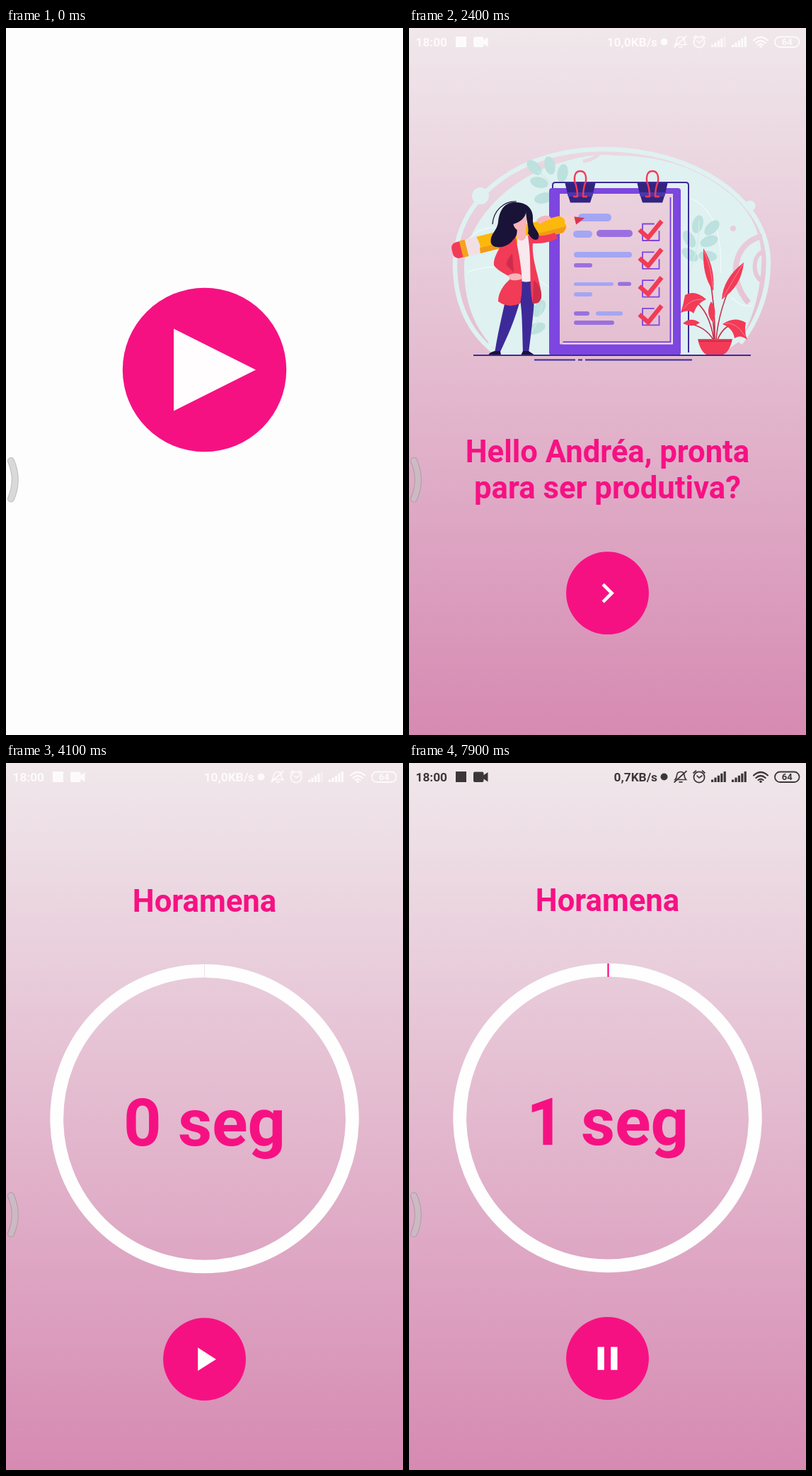
An HTML page that plays this animation: 561x998 px, repeating every 8000 ms.

```html
<!DOCTYPE html>
<html lang="pt">
<head>
<meta charset="utf-8">
<title>Timer</title>
<style>
html, body { margin: 0; width: 100%; height: 100%; overflow: hidden; background: #fefdfe; }
svg { display: block; width: 100vw; height: 100vh; }
text { font-family: Roboto, sans-serif; font-weight: 700; }
.title { font-size: 43.64px; text-anchor: middle; fill: #f61183; }
.count { font-size: 93.5px; text-anchor: middle; fill: #f61183; }
.small { font-size: 17.3px; fill: currentColor; font-weight: 600; }
</style>
</head>
<body>
<svg id="stage" viewBox="0 0 561 998" xmlns="http://www.w3.org/2000/svg"></svg>
<script>
const PINK = '#f61183', MINT = '#dff1f1', LEAF = '#bce1de', RED = '#f23b57', DARKRED = '#cf2c4c',
  PURPLE = '#7d46e0', LAV = '#a4a6f4', VIOLET = '#9a70e0', NAVY = '#3d2a98', HAIR = '#191338', SKIN = '#f8b4b8';

const path = (d, fill, extra = '') => `<path d="${d}" fill="${fill}" ${extra}/>`;
const line = (d, color, w, extra = '') =>
  `<path d="${d}" fill="none" stroke="${color}" stroke-width="${w}" ${extra}/>`;
const rect = (x, y, w, h, fill, r = 0) =>
  `<rect x="${x}" y="${y}" width="${w}" height="${h}" rx="${r}" fill="${fill}"/>`;
const circle = (x, y, r, fill) => `<circle cx="${x}" cy="${y}" r="${r}" fill="${fill}"/>`;
const oval = (x, y, rx, ry, rot, fill) =>
  `<ellipse rx="${rx}" ry="${ry}" fill="${fill}" transform="translate(${x} ${y}) rotate(${rot})"/>`;
const ROUND = 'stroke-linecap="round" stroke-linejoin="round"';

function backdrop() {
  const leaves = [[177, 197, 45], [199, 194, 78], [184, 218, 14], [217, 205, 100], [190, 240, -14],
    [408, 277, 105], [428, 282, 135], [396, 298, 60], [424, 301, 160], [397, 320, 35], [422, 322, 185],
    [184, 396, 120], [180, 424, 160]];
  return line('M122 458C84 430 64 385 65 330C68 235 160 171 275 171C400 171 507 240 508 330C508 375 492 415 468 445', MINT, 6.5) +
    path('M130 461C95 432 77 390 78 335C80 275 140 208 225 187Q262 176 290 180C360 180 410 198 455 235C490 265 500 300 498 335C496 380 482 420 466 443L440 461Z', MINT) +
    line('M270 176Q262 186 246 188', 'url(#bg)', 5) +
    line('M499 294C460 302 448 352 480 388', 'url(#bg)', 8) +
    line('M499 316C485 324 485 348 499 358', 'url(#bg)', 6) +
    line('M82 300Q112 268 150 292M82 345Q140 322 198 366M398 240Q445 262 440 345M455 380Q470 395 486 392', '#f3fafa', 1.2) +
    circle(101, 237, 12, MINT) + circle(482, 251, 7.5, MINT) + circle(116, 446, 4, MINT) +
    circle(458, 283, 4, 'url(#bg)') +
    leaves.map(([x, y, a]) => oval(x, y, 13, 7.5, a, LEAF)).join('') +
    line('M238 258Q210 225 182 202M396 345Q410 312 410 272M168 434Q184 418 188 390', '#d3ebe9', 1.3);
}

function board() {
  const bars = [[239, 262, 47, 11, LAV], [232, 286, 27, 10, LAV], [265, 285, 51, 10, VIOLET],
    [233, 316, 82, 8, LAV], [233, 332, 26, 6, VIOLET], [233, 359, 56, 5, LAV], [295, 358.5, 19, 5.5, VIOLET],
    [233, 373, 26, 6, LAV], [233, 400, 22, 6, VIOLET], [264, 400, 38, 6, LAV], [233, 413, 57, 6, VIOLET]];
  const clip = x => path(`M${x - 21.5} 219H${x + 21.5}L${x + 18} 234L${x + 14} 246.5H${x - 14}L${x - 18} 234Z`, '#33247f') +
    path(`M${x - 18.5} 232H${x + 18.5}L${x + 17} 238H${x - 17}Z`, '#4b35ad') +
    line(`M${x - 9} 238H${x - 4}Q${x - 4} 226 ${x - 8} 216Q${x - 9} 202 ${x} 202Q${x + 9} 202 ${x + 8} 216Q${x + 4} 226 ${x + 4} 238H${x + 9}`, RED, 2.4, ROUND);
  const check = i => {
    const y = i * 39.8;
    return line(`M346 ${276.5 + y}H330V${300 + y}H353.5V${287 + y}`, PURPLE, 1.8, ROUND) +
      line(`M325.5 ${285 + y}L338 ${296 + y}L357 ${272.5 + y}`, RED, 6.3);
  };
  return line('M203 227V222Q203 218 207 218H391Q395 218 395 222V458', NAVY, 2) +
    rect(198, 226, 186, 236, PURPLE, 4) + rect(213, 234, 160, 212.5, 'url(#bg)') +
    line('M217.5 445.4H371.6V239', '#f4e9f3', 1.6) + line('M217.5 443.3H369.5V239', PURPLE, 2) +
    bars.map(([x, y, w, h, c]) => rect(x, y, w, h, c, h / 2)).join('') +
    [0, 1, 2, 3].map(check).join('') + clip(242) + clip(344);
}

function pencil() {
  return `<g transform="translate(61 315) rotate(-14)">` +
    rect(0, -11, 30, 23, RED, 8) + rect(13, -11.5, 9, 24, '#f5a31d') + rect(21, -11.5, 18, 24, '#f1dfe4') +
    path('M38 -11.5H158Q168 -6 164 0Q168 8 158 12.5H38Q42 0 38 -11.5Z', '#fbb80d') +
    path('M39 5H164Q164 9 158 12.5H38Z', '#f39a16') +
    path('M160 -11L180 -5.5V5.5L160 12Q168 6 164 0Q168 -6 160 -11Z', '#f4cfcd') +
    path('M179 -5.5L193 0L179 6Z', '#d93650') + '</g>';
}

function woman() {
  return path('M143 352H179C177 395 174 420 169 459H161C160 425 160 400 157 384C150 412 138 438 128 459H121C127 420 137 385 143 352Z', NAVY) +
    line('M159 362Q159 376 157 388', '#271a72', 1.2) +
    path('M121 456H129L130 462H112Q113 458 121 456ZM161 456H169L178 462H158Z', HAIR) +
    path('M153 293H172L175 356Q164 362 153 354Z', '#f7e9ee') +
    path('M152 280H165V296Q159 304 152 296Z', SKIN) +
    path('M168 293Q190 295 206 289L210 297Q195 305 175 304C173 330 186 355 187 378Q185 390 175 389C169 365 174 330 168 293Z', RED) +
    path('M176 356Q188 364 187 381Q184 391 175 388Z', DARKRED) +
    path('M150 294Q135 298 131 305C125 316 119 325 120 335C124 342 138 348 145 353C133 362 126 374 126 386Q140 396 157 389C164 360 156 320 150 294Z', RED) +
    path('M146 318Q136 330 138 335L148 345Z', DARKRED) +
    path('M140 349Q150 344 158 348L160 354Q150 358 143 355Z', SKIN) +
    path('M180 271Q190 262 199 266L201 270Q191 272 185 277Z', SKIN) +
    path('M148 246C132 247 127 262 126 274C125 286 113 292 116 304C121 314 141 309 147 299C154 294 153 285 152 276L165 258C166 275 170 281 168 290Q176 302 182 298C188 288 174 284 175 270C176 255 166 245 148 246Z', HAIR) +
    path('M147 276Q160 274 164 262Q167 270 166 279Q163 288 157 287Q149 285 147 276Z', SKIN) +
    path('M140 262Q152 246 166 258Q164 272 147 277Z', HAIR) +
    line('M118 277C119 259 133 244 152 245', HAIR, 1.2);
}

function plant() {
  return line('M432 440Q433 390 424 350M434 440Q438 395 460 352M431 440Q424 398 402 384M436 440Q446 416 466 418M430 440Q418 420 392 417M432 440L428 396', '#c4304d', 1.6) +
    path('M416 311Q433 338 430 371Q414 350 416 311Z', RED) +
    path('M473 331Q470 364 442 383Q444 353 473 331Z', RED) +
    path('M420 383Q404 369 390 377Q388 390 384 402Q396 396 402 403Q407 388 420 383Z', RED) +
    path('M443 418Q460 406 476 416Q473 428 478 440Q468 432 460 438Q458 424 443 418Z', RED) +
    path('M427 386Q437 400 429 415Q418 402 427 386Z', RED) +
    path('M387 417Q398 407 411 416Q400 424 387 417Z', RED) +
    line('M417 315Q428 340 429 366M471 334Q457 358 444 380M388 396Q398 382 415 383M446 417Q462 414 475 435', '#f98a97', .9) +
    path('M408 439H457Q452 462 439 462H425Q413 462 408 439Z', RED) +
    line('M409 442H456', DARKRED, 2);
}

const art = () => backdrop() + board() + pencil() + woman() + plant() +
  line('M91 462H483', NAVY, 2) + line('M177 468.5H235M249 468.5H400M239 468.5H245', NAVY, 1.8);

// 24-unit icon grid drawn at 36dp
const icon = (id, y, d) =>
  `<path id="${id}" d="${d}" fill="#fff" transform="translate(280.5 ${y}) scale(2.337) translate(-12 -12)"/>`;

function statusBar() {
  const bars = (x, id) => [0, 1, 2, 3, 4].map(i =>
    `<rect x="${x + i * 4.4}" y="${23.5 - i * 2.9}" width="3.2" height="${3.5 + i * 2.9}" fill="currentColor"${i > 3 ? ` id="${id}"` : ''}/>`).join('');
  const ink = (d, w) => line(d, 'currentColor', w, 'stroke-linecap="round"');
  return `<g id="status">
    <text class="small" x="9.5" y="26.3">18:00</text>
    <text class="small" id="speed" x="351" y="26.3" text-anchor="end"></text>` +
    rect(66, 12, 15, 15, 'currentColor') +
    rect(91, 12.5, 14.5, 14.5, 'currentColor', 2) + path('M104 18L111.5 13V26.5L104 21.5Z', 'currentColor') +
    circle(360.5, 19.5, 5, 'currentColor') +
    ink('M376 23.5Q378.5 21 378.5 17Q379 12.5 384 12.5Q388.5 12.5 389 17Q389 21 391.5 23.5ZM382 26.8H386', 1.7) +
    ink('M375 27L392 11.5', 1.7) +
    `<circle cx="410" cy="20" r="7.6" fill="none" stroke="currentColor" stroke-width="1.8"/>` +
    ink('M407 18L410 21L414 18M402 14L405.5 11M418 14L414.5 11', 1.7) +
    bars(427, 'weak') + bars(456, 'strong') +
    ink('M487 17.5Q497 8.5 507 17.5M490.3 21Q497 15 503.7 21M493.5 24Q497 21.2 500.5 24', 2.2) +
    circle(497, 26.2, 1.8, 'currentColor') +
    `<rect x="517" y="12.5" width="34.5" height="14.5" rx="7.2" fill="none" stroke="currentColor" stroke-width="1.8"/>
    <text x="534.3" y="24.4" font-size="13" text-anchor="middle" fill="currentColor">64</text></g>`;
}

const HANDLE = 'M7 611Q18.5 638 7 664.5';

document.getElementById('stage').innerHTML = `
  <defs><linearGradient id="bg" gradientUnits="userSpaceOnUse" x1="0" y1="0" x2="0" y2="998">
    <stop offset="0" stop-color="#f0e8eb"/><stop offset="1" stop-color="#d68ab2"/></linearGradient></defs>
  <g id="hello">${rect(0, 0, 561, 998, 'url(#bg)')}
    <g id="art">${art()}</g>
    <text class="title" x="280.5" y="613">Hello Andréa, pronta</text>
    <text class="title" x="280.5" y="664.4">para ser produtiva?</text>
    <g id="next">${circle(280.5, 797.7, 58.4, PINK)}${icon('arrow', 797.7, 'M10 6L8.59 7.41 13.17 12l-4.58 4.59L10 18l6-6z')}</g>
  </g>
  <g id="timer">${rect(0, 0, 561, 998, 'url(#bg)')}
    <text class="title" x="280.5" y="209">Horamena</text>
    <circle cx="280.5" cy="501" r="208.8" fill="none" stroke="#fdfefd" stroke-width="18.8"/>
    <path d="M280.5 283V302" stroke="#f3dfe9" stroke-width="1"/>
    <path id="tick" d="M281.5 283V302" stroke="${PINK}" stroke-width="2.2"/>
    <text class="count" id="count" x="280.5" y="538.5"></text>
    <g id="toggle">${circle(280.5, 840.5, 58.4, PINK)}${icon('play', 840.5, 'M8 5v14l11-7z')}${icon('pause', 840.5, 'M6 19h4V5H6zM14 5v14h4V5z')}</g>
  </g>
  ${statusBar()}
  <g id="splash">${rect(0, 0, 561, 998, '#fefdfe')}${circle(280.5, 482.5, 115.7, PINK)}${path('M237 424.5L353 482.5L237 540.5Z', '#fffdfe')}</g>
  <g opacity=".6">${line(HANDLE, '#8f9090', 10, ROUND)}${line(HANDLE, '#c0c4c2', 8, ROUND)}</g>`;

const $ = id => document.getElementById(id);
const span = (t, a, b) => Math.min(1, Math.max(0, (t - a) / (b - a)));
const ease = p => p < .5 ? 2 * p * p : 1 - 2 * (1 - p) ** 2;
const show = (id, on) => $(id).setAttribute('display', on ? 'inline' : 'none');
const fade = (id, v) => $(id).setAttribute('opacity', v);
// touch feedback: dim to 20 %, then recover after release
const press = (t, at) => 1 - .8 * ease(span(t, at - 150, at)) + .8 * ease(span(t, at, at + 250));

const LOOP = 8000, STEP = 100;
const HOME = 2100, OPEN = 3900, DARK = 5000, SPEED = 5700, START = 5900;

function draw(t) {
  show('splash', t < HOME);
  show('status', t >= HOME);
  fade('art', span(t, HOME - 100, HOME + 200));
  fade('next', press(t, OPEN));

  // the timer rises into place while it fades in
  const p = 1 - (1 - span(t, OPEN, OPEN + 350)) ** 5;
  show('timer', t > OPEN);
  fade('timer', span(p, 0, .95));
  $('timer').setAttribute('transform', `translate(0 ${(1 - p) * 80})`);

  const running = t >= START;
  const secs = running ? Math.floor((t - START - 50) / 1000) : 0;
  $('count').textContent = `${Math.max(0, secs)} seg`;
  show('tick', secs > 0);
  show('play', !running);
  show('pause', running);
  fade('toggle', press(t, START));

  const dark = t >= DARK;
  $('status').setAttribute('color', dark ? '#3b3739' : '#fdfafb');
  fade('weak', dark ? 1 : .4);
  $('speed').textContent = t >= SPEED ? '0,7KB/s' : '10,0KB/s';
}

const begin = performance.now();
function tick() {
  const t = (performance.now() - begin) % LOOP;
  draw(Math.floor(t / STEP) * STEP);
  requestAnimationFrame(tick);
}
tick();
</script>
</body>
</html>
```
